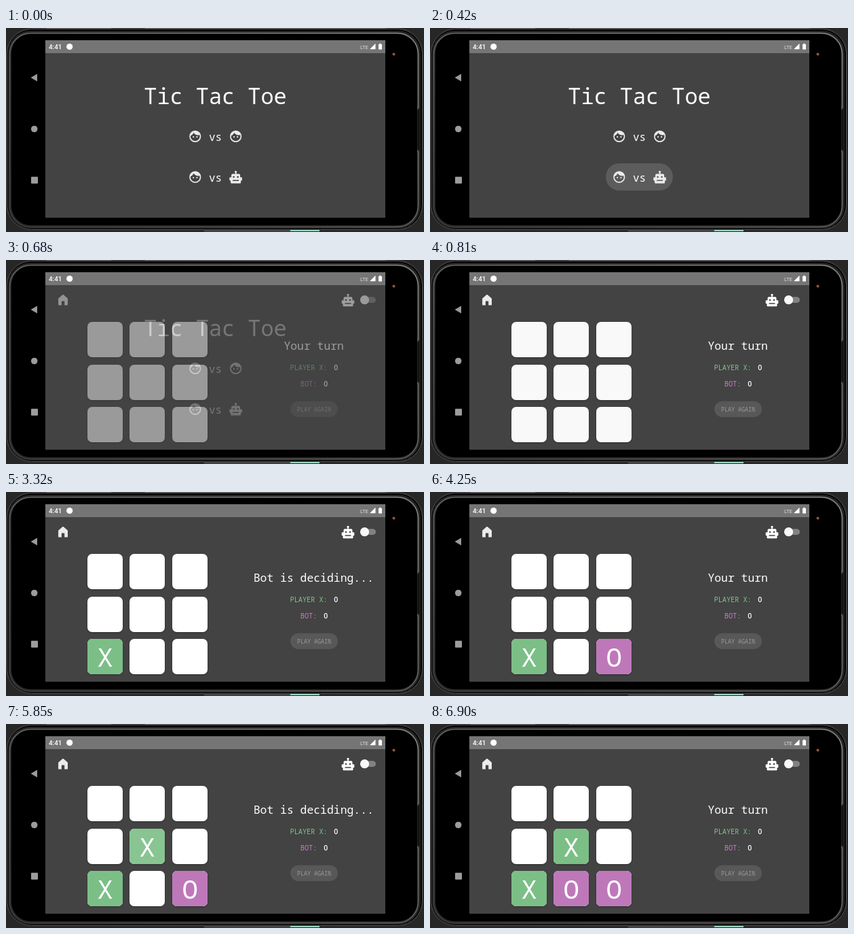
An HTML page that plays this animation: 616 by 300 pixels, repeating every 8 s.

```html
<!DOCTYPE html>
<html lang="en">
<head>
<meta charset="utf-8">
<title>Tic Tac Toe</title>
<style>
  html, body { margin: 0; width: 100%; height: 100%; overflow: hidden; background: #272727; }
  svg { display: block; width: 616px; height: 300px; }
  text { font-family: "Noto Sans Mono", "DejaVu Sans Mono", monospace; fill: #fff; }
  .mid { text-anchor: middle; }
  .status { font-family: Roboto, sans-serif; }
  .digit { font: 600 10.5px "Open Sans", sans-serif; text-anchor: middle; }
  .label { font-size: 10.2px; }
  .turn { font-size: 16.4px; text-anchor: middle; }
  .mark { font-size: 39px; font-weight: 500; text-anchor: middle; }
  .icon { fill: #ebebeb; }
  .green { fill: #7bc688; }
  .pink { fill: #c77dc5; }

  /* hard cuts on one shared 8 s clock */
  .clip { animation: 8s step-end infinite; }
  .menu { animation-name: menu; }
  .ghost { animation-name: ghost; mix-blend-mode: plus-lighter; }
  .press { animation-name: press; }
  .game { animation-name: game; }
  .yours { animation-name: yours; }
  .bots { animation-name: bots; }
  .blank { animation-name: blank; }
  .move1 { animation-name: move1; }
  .move2 { animation-name: move2; }
  .move3 { animation-name: move3; }
  .move4 { animation-name: move4; }
  .settle { animation-name: settle; }
  @keyframes menu { 0% { opacity: 1 } 8.5%, 100% { opacity: 0 } }
  @keyframes ghost { 0% { opacity: 0 } 8.5% { opacity: .2 } 10.125%, 100% { opacity: 0 } }
  @keyframes press { 0% { opacity: 0 } 5.25% { opacity: 1 } 8.5%, 100% { opacity: 0 } }
  @keyframes game { 0% { opacity: 0 } 8.5% { opacity: .48 } 10.125%, 100% { opacity: 1 } }
  @keyframes yours {
    0% { opacity: 1 } 41.5% { opacity: 0 } 53.125% { opacity: 1 }
    73.125% { opacity: 0 } 86.25%, 100% { opacity: 1 }
  }
  @keyframes bots {
    0% { opacity: 0 } 41.5% { opacity: 1 } 53.125% { opacity: 0 }
    73.125% { opacity: 1 } 86.25%, 100% { opacity: 0 }
  }
  @keyframes blank { 0% { fill: #f9f9f9 } 41.5%, 100% { fill: #fff } }
  @keyframes move1 { 0% { opacity: 0 } 41.5%, 100% { opacity: 1 } }
  @keyframes move2 { 0% { opacity: 0 } 53.125%, 100% { opacity: 1 } }
  @keyframes move3 { 0% { opacity: 0 } 73.125%, 100% { opacity: 1 } }
  @keyframes move4 { 0% { opacity: 0 } 86.25%, 100% { opacity: 1 } }
  @keyframes settle { 0% { fill: #88c592 } 86.25%, 100% { fill: #7bbf87 } }
</style>
</head>
<body>
<svg viewBox="0 0 616 300">
  <defs>
    <path id="face" transform="scale(.86) translate(-12 -12)" d="M9 11.75a1.25 1.25 0 1 0 0 2.5 1.25 1.25 0 0 0 0-2.5zm6 0a1.25 1.25 0 1 0 0 2.5 1.25 1.25 0 0 0 0-2.5zM12 2a10 10 0 1 0 0 20 10 10 0 0 0 0-20zm0 18c-4.41 0-8-3.59-8-8 0-.29.02-.58.05-.86 2.36-1.05 4.23-2.98 5.21-5.37C11.07 8.33 14.05 10 17.42 10c.78 0 1.53-.09 2.25-.26.21.71.33 1.47.33 2.26 0 4.41-3.59 8-8 8z"/>
    <g id="bot">
      <circle cy="-8" r="1.6"/>
      <path d="M-.8-8H.8v4H-.8z"/>
      <path fill-rule="evenodd" d="M-4.500-5h9q2 0 2 2v3h1.800q1 0 1 1v3q0 1-1 1H7.500v2.800q0 1.200-1.200 1.200H-6.300q-1.200 0-1.200-1.200V5H-8.300q-1 0-1-1V1q0-1 1-1H-6.500V-3q0-2 2-2zM-3-1.800a1.300 1.300 0 1 0 .01 0zM3-1.800a1.300 1.300 0 1 0 .01 0zM-4.500 4h9v1.400h-9z"/>
    </g>
    <rect id="tile" width="52" height="52" rx="7"/>
    <filter id="shade" x="-10%" y="-10%" width="120%" height="120%">
      <feDropShadow dx="0" dy="1" stdDeviation="1.2" flood-opacity=".3"/>
    </filter>
    <linearGradient id="rim" x1="0" y1="1" x2="1" y2="0">
      <stop offset="0" stop-color="#3c3c3c"/>
      <stop offset="1" stop-color="#8a8a8a"/>
    </linearGradient>
  </defs>

  <!-- phone -->
  <rect x="1.5" y="1.5" width="612" height="295" rx="36" stroke="#585858"/>
  <g fill="none">
    <rect x="5.500" y="6.500" width="603" height="286" rx="31" stroke="#242424" stroke-width="5"/>
    <rect x="5.500" y="7.500" width="602" height="285" rx="31" stroke="url(#rim)" stroke-width="1.500"/>
    <path d="M60 .5H155M205 .5H560" stroke="#505050"/>
    <path d="M608 118V181" stroke="#111" stroke-width="3"/>
    <path d="M607 116v4M607 179v4" stroke="#777"/>
    <path d="M292 298.500H420" stroke="#666"/>
    <path d="M419 298H462" stroke="#9bd5bb" stroke-width="2"/>
  </g>
  <circle cx="571.500" cy="38.500" r="2.200" fill="#6b3a20"/>
  <circle cx="571.500" cy="38.500" r="1" fill="#d98550"/>
  <g fill="#9c9c9c">
    <path d="M36.500 73L46 67.500V78.500z"/>
    <circle cx="41.700" cy="148.500" r="4.800"/>
    <rect x="37" y="218.800" width="10" height="10" rx=".8"/>
  </g>

  <!-- screen -->
  <rect x="58" y="18" width="501" height="261" fill="#434343"/>
  <rect x="58" y="18" width="501" height="19" fill="#757575"/>
  <text class="status" x="63" y="31.200" font-size="9.800" font-weight="500">4:41</text>
  <circle cx="93.700" cy="27.500" r="4.600" fill="#fff"/>
  <text class="status" x="522" y="30.800" font-size="7.600" style="fill:#e0e0e0">LTE</text>
  <path d="M536 31.300L544.500 22.800V31.300z" fill="#fff"/>
  <path d="M549 24h1.400v-1.300h2.200V24H554v7.600h-5z" fill="#fff"/>

  <g class="clip game">
    <path class="icon" transform="translate(73.600 48.300) scale(.87)" d="M4 20V10q0-.6.5-1L11 3.500q1-.8 2 0L19.500 9q.5.400.5 1V20q0 .8-.8.8H14.500V14h-5v6.800H4.800Q4 20.800 4 20z"/>
    <use href="#bot" x="504" y="59.300" fill="#fff"/>
    <rect x="523" y="54.300" width="22" height="8.800" rx="4.400" fill="#818181"/>
    <circle cx="528.500" cy="58.700" r="6.600" fill="#f8f8f8"/>

    <g id="board"></g>

    <text class="turn clip yours" x="453.700" y="132.300">Your turn</text>
    <text class="turn clip bots" x="453.300" y="132.300">Bot is deciding...</text>
    <text class="label green" x="418.600" y="162">PLAYER X:</text>
    <text class="digit" x="486.300" y="162">0</text>
    <text class="label pink" x="433.800" y="185.500">BOT:</text>
    <text class="digit" x="471.300" y="185.500">0</text>
    <rect x="419" y="207.700" width="70" height="23.300" rx="11.650" fill="#585858"/>
    <text class="mid" x="454" y="222.600" font-size="8.350" style="fill:#9b9b9b">PLAY AGAIN</text>
  </g>

  <g class="clip menu">
    <g id="menu">
      <rect class="clip press" x="259" y="199" width="99" height="40" rx="20" fill="#5c5c5c"/>
      <text class="mid" x="308.500" y="111.600" font-size="31.900">Tic Tac Toe</text>
      <g class="icon">
        <use href="#face" x="278.800" y="159.300"/>
        <use href="#face" x="338.600" y="159.300"/>
        <use href="#face" x="278.800" y="219.200"/>
        <use href="#bot" x="338.600" y="219.500"/>
      </g>
      <text class="mid" x="308.500" y="165.600" font-size="16">vs</text>
      <text class="mid" x="308.500" y="225.600" font-size="16">vs</text>
    </g>
  </g>
  <use href="#menu" class="clip ghost"/>
</svg>
<script>
  const board = document.getElementById("board");
  const pitch = 62.5;
  const at = (col, row) =>
    `translate(${Math.round(119.9 + pitch * col)} ${Math.round(91 + pitch * row)})`;
  let cells = "";

  for (let i = 0; i < 9; i++) {
    cells += `<g transform="${at(i % 3, Math.floor(i / 3))}">
      <use href="#tile" class="clip blank" filter="url(#shade)"/></g>`;
  }

  const moves = [[0, 2, "X"], [2, 2, "O"], [1, 1, "X"], [1, 2, "O"]];
  moves.forEach(([col, row, mark], i) => {
    const fill = mark === "X" ? "#7bbf87" : "#be78ba";
    cells += `<g transform="${at(col, row)}"><g class="clip move${i + 1}">
      <use href="#tile" fill="${fill}"${i === 2 ? ' class="clip settle"' : ""}/>
      <text class="mark" x="26.3" y="40.8">${mark}</text></g></g>`;
  });
  board.innerHTML = cells;
</script>
</body>
</html>
```
